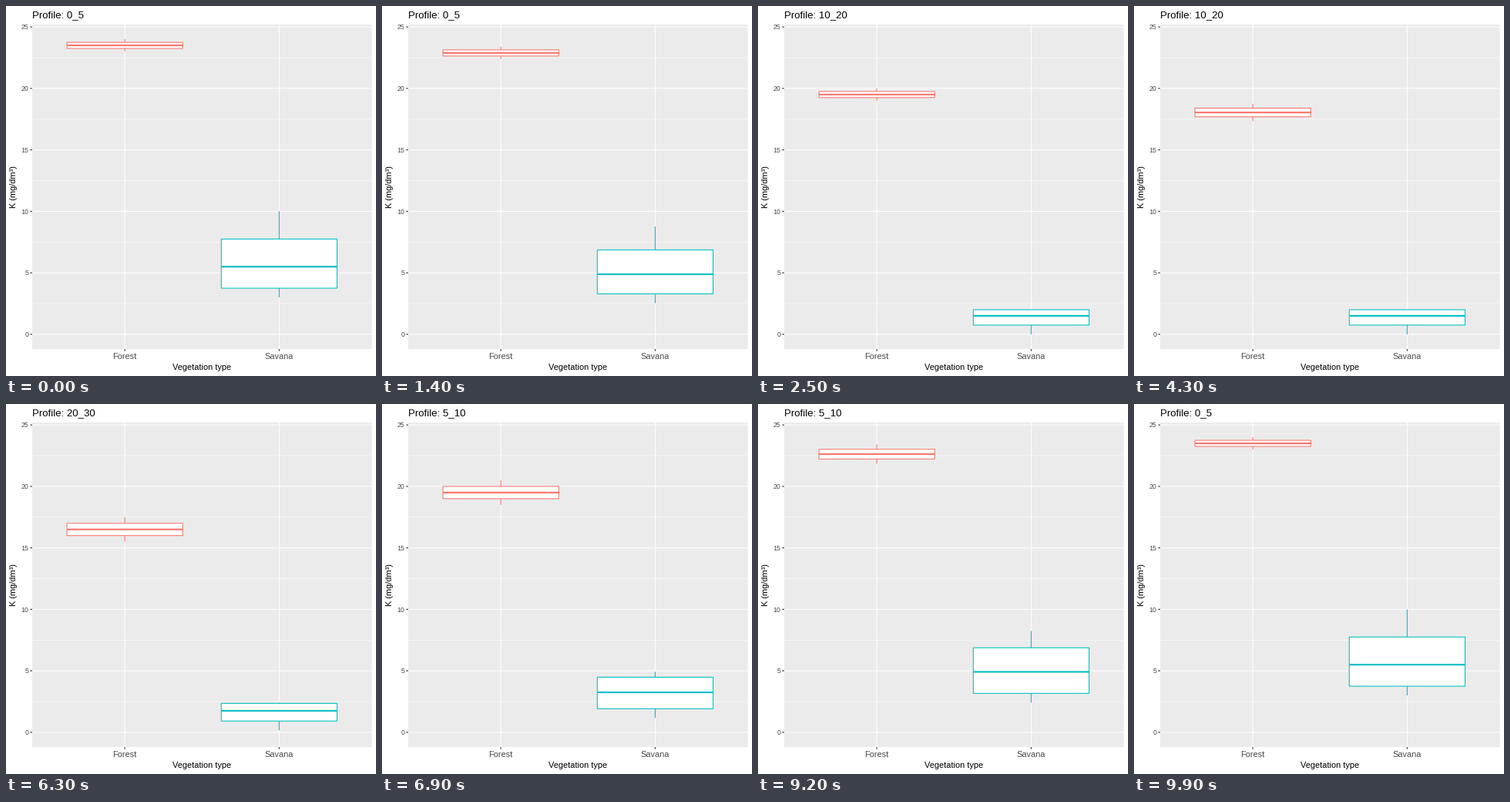
Animation, 480 px wide and 480 px high, one loop 10 s. Source, as a matplotlib script:

```python
import matplotlib.pyplot as plt
from matplotlib.animation import FuncAnimation
from matplotlib.lines import Line2D
from matplotlib.patches import Rectangle

plt.rcParams["font.family"] = "Liberation Sans"

SIZE, DPI = 480, 72          # at 72 dpi one point is one pixel
LEFT, RIGHT = 34.0, 474.52   # panel edges
ZERO, UNIT = 425.9, 15.95    # pixel row of 0, pixels per data unit
STEP = (RIGHT - LEFT) / 2.2  # distance between categories
LINE = 1.07

# label, forest and savana as (min, q1, median, q3, max)
STATES = [
    ("0_5", (23, 23.25, 23.5, 23.75, 24), (3, 3.75, 5.5, 7.75, 10)),
    ("10_20", (19, 19.25, 19.5, 19.75, 20), (0, 0.75, 1.5, 2, 2)),
    ("20_30", (15, 15.5, 16, 16.5, 17), (0, 0.75, 1.5, 2, 2)),
    ("5_10", (21, 21.5, 22, 22.5, 23), (2, 2.75, 4.5, 6.25, 7)),
]
# (hold, move) lengths in frames
PHASES = [(13, 13), (13, 12), (12, 12), (13, 12)]


def ypix(v):
    return ZERO - v * UNIT


def xpix(i):
    return LEFT + (i + 0.6) * STEP


TOP, BOTTOM = ypix(25.2), ypix(-1.2)

fig = plt.figure(figsize=(SIZE / DPI, SIZE / DPI), dpi=DPI, facecolor="white")
ax = fig.add_axes([0, 0, 1, 1])
ax.set(xlim=(0, SIZE), ylim=(SIZE, 0))
ax.axis("off")


def line(xs, ys, color, width=LINE, z=1):
    item = Line2D(xs, ys, color=color, lw=width, zorder=z,
                  solid_capstyle="butt", snap=False)
    return ax.add_line(item)


def text(x, y, s, size, color="black", ha="center", **kw):
    return ax.text(x, y, s, fontsize=size, color=color, ha=ha,
                   va="baseline", **kw)


class Box:
    def __init__(self, x, color):
        self.x, half = x, 0.375 * STEP
        self.low = line([x, x], [0, 0], color, z=3)
        self.high = line([x, x], [0, 0], color, z=3)
        self.body = ax.add_patch(Rectangle(
            (x - half, 0), 2 * half, 1, facecolor="white", edgecolor=color,
            lw=LINE, joinstyle="miter", snap=False, zorder=4))
        self.median = line([x - half, x + half], [0, 0], color, 2 * LINE, 5)

    def place(self, values):
        lo, q1, med, q3, hi = map(ypix, values)
        self.low.set_ydata([q1, lo])
        self.high.set_ydata([q3, hi])
        self.body.set_y(q3)
        self.body.set_height(q1 - q3)
        self.median.set_ydata([med, med])


def draw_panel():
    ax.add_patch(Rectangle((LEFT, TOP), RIGHT - LEFT, BOTTOM - TOP,
                           facecolor="#EBEBEB", lw=0, snap=False, zorder=0))
    for k in range(5):
        y = ypix(2.5 + 5 * k)
        line([LEFT, RIGHT], [y, y], "white", LINE / 2)
    for v in range(0, 26, 5):
        y = ypix(v)
        line([LEFT, RIGHT], [y, y], "white")
        line([LEFT - 2.74, LEFT], [y, y], "#333333")
        text(29.1, y + 3.15, str(v), 8.8, "#4D4D4D", "right")
    for i, name in enumerate(["Forest", "Savana"]):
        x = xpix(i)
        line([x, x], [TOP, BOTTOM], "white")
        line([x, x], [BOTTOM, BOTTOM + 2.74], "#333333")
        text(x, 458, name, 11, "#4D4D4D")
    text((LEFT + RIGHT) / 2, 472, "Vegetation type", 11)
    text(13.4, (TOP + BOTTOM) / 2, "K (mg/dm³)", 11,
         rotation=90, rotation_mode="anchor")


draw_panel()
title = text(LEFT, 15, "", 13.2, ha="left")
boxes = [Box(xpix(0), "#F8766D"), Box(xpix(1), "#00BFC4")]


def locate(n):
    """Return the current state, the next one, progress and nearest label."""
    for i, (hold, move) in enumerate(PHASES):
        if n < hold + move:
            break
        n -= hold + move
    now, nxt = STATES[i], STATES[(i + 1) % len(STATES)]
    done = max(0, n - hold + 1)
    near = now if done <= (move + 1) // 2 else nxt
    return now, nxt, done / move, near[0]


def update(n):
    now, nxt, t, label = locate(n)
    title.set_text(f"Profile: {label}")
    for box, a, b in zip(boxes, now[1:], nxt[1:]):
        box.place([p + (q - p) * t for p, q in zip(a, b)])
    return []


anim = FuncAnimation(fig, update, frames=100, interval=100,
                     repeat=True, repeat_delay=0)
plt.show()
```
